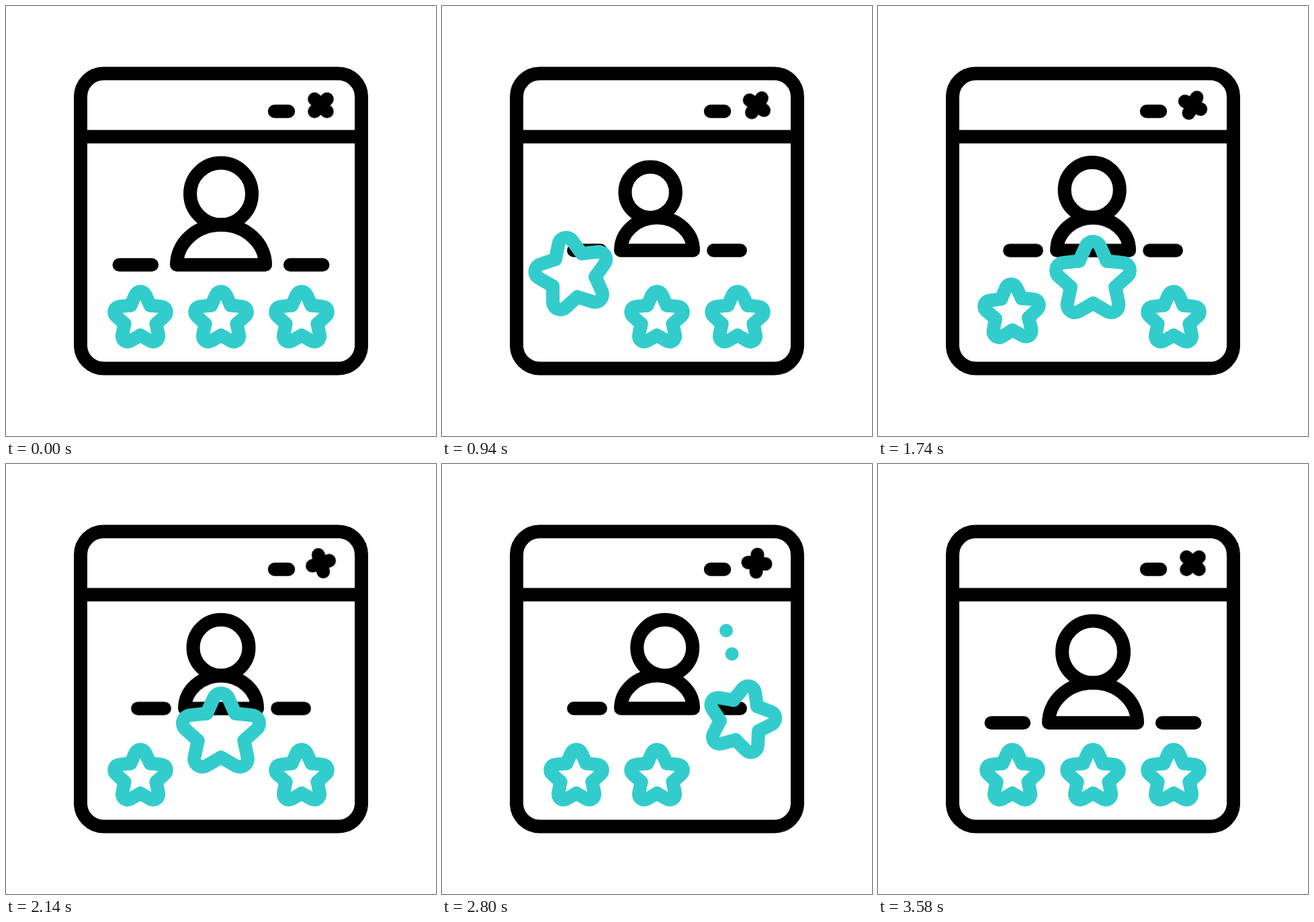
An HTML page without scripts for the animation above (3600 ms loop, 640 by 640 pixels).

```html
<!DOCTYPE html>
<html lang="en">
<head>
<meta charset="utf-8">
<title>Profile rating</title>
<style>
  @property --p { syntax: "<number>"; inherits: true; initial-value: 0; }

  html, body { margin: 0; height: 100%; overflow: hidden; background: #fff; }
  svg { display: block; width: 100vw; height: 100vh; }

  svg { fill: none; stroke: #000; stroke-width: 20px; stroke-linecap: round; stroke-linejoin: round; }
  .teal { stroke: #3cc; }

  /* --p runs from rest (0) to the full pose (1); strokes keep their width */
  .pose {
    --s: calc(1 + var(--grow) * var(--p));
    transform:
      translate(calc(var(--x) + var(--dx, 0px) * var(--p)), calc(var(--y) + var(--dy, 0px) * var(--p)))
      rotate(calc(var(--turn, 0deg) * var(--p)))
      scale(var(--s));
    stroke-width: calc(20px / var(--s));
  }
  .pose, .head, .close, .spark { animation: 3600ms cubic-bezier(.37, 0, .63, 1) infinite; }

  .figure { --x: 320px; --y: 267px; --grow: -.182; animation-name: shrink; }
  .left   { --x: 200px; --y: 465.5px; --dx: -7px; --dy: -80px; --turn: -15deg; --grow: .465; animation-name: first; }
  .middle { --x: 320px; --y: 465.5px; --dy: -65px; --grow: .465; animation-name: next; }
  .right  { --x: 440px; --y: 465.5px; --dx: 5px; --dy: -85px; --turn: 15deg; --grow: .266; animation-name: next; animation-delay: 800ms; }
  .head   { cx: 320px; cy: 279.5px; r: 46px; animation-name: look; }
  .close  { transform: translate(468.5px, 147.7px); animation-name: spin; animation-timing-function: linear; }
  .spark  { stroke-dasharray: 1px 2px; animation-name: spark; }

  @keyframes shrink {
    0%, 5.556% { --p: 0; }
    15.556%, 81.944% { --p: 1; }
    95.833%, 100% { --p: 0; }
  }
  @keyframes first {
    0%, 16.111% { --p: 0; }
    30%, 37.5% { --p: 1; }
    51.389%, 100% { --p: 0; }
  }
  @keyframes next {
    0%, 37.5% { --p: 0; }
    51.389%, 59.722% { --p: 1; }
    73.611%, 100% { --p: 0; }
  }
  @keyframes look {
    0%, 5.556% { cx: 320px; cy: 279.5px; r: 46px; }
    15.556%, 16.111% { cx: 320px; cy: 277.2px; r: 37.7px; }
    30%, 37.5% { cx: 308px; cy: 277.2px; r: 37.7px; }
    51.389%, 59.722% { cx: 320px; cy: 273.3px; r: 41.5px; }
    73.611%, 81.944% { cx: 331.7px; cy: 273.3px; r: 41.5px; }
    95.833%, 100% { cx: 320px; cy: 279.5px; r: 46px; }
  }
  @keyframes spin {
    0%, 5.556% { transform: translate(468.5px, 147.7px) rotate(0deg); }
    16.111% { transform: translate(468.5px, 147.7px) rotate(-57deg); }
    40% { transform: translate(468.5px, 147.7px) rotate(-159deg); }
    48.333% { transform: translate(468.5px, 147.7px) rotate(-198deg); }
    66.667% { transform: translate(468.5px, 147.7px) rotate(-270deg); }
    88.889% { transform: translate(468.5px, 147.7px) rotate(-350.5deg); animation-timing-function: cubic-bezier(.1, .42, .4, 1); }
    100% { transform: translate(468.5px, 147.7px) rotate(-360deg); }
  }
  @keyframes spark {
    0%, 77.7% { visibility: hidden; stroke-dashoffset: 1px; }
    77.8% { visibility: visible; stroke-dashoffset: 1px; }
    84.7%, 89% { visibility: visible; stroke-dashoffset: 0px; }
    95.4% { visibility: visible; stroke-dashoffset: -1px; }
    95.5%, 100% { visibility: hidden; stroke-dashoffset: -1px; }
  }
</style>
</head>
<body>
<svg viewBox="0 0 640 640">
  <defs>
    <path id="arm" d="M-14.5-19.9L-7.5-35.6A8.2 8.2 0 0 1 7.5-35.6L14.5-19.9"/>
    <g id="star">
      <use href="#arm"/>
      <use href="#arm" transform="rotate(72)"/>
      <use href="#arm" transform="rotate(144)"/>
      <use href="#arm" transform="rotate(216)"/>
      <use href="#arm" transform="rotate(288)"/>
    </g>
  </defs>

  <rect x="111" y="100.5" width="418" height="439" rx="34.5"/>
  <path d="M111 194.4H529M399.8 156.8H420.2"/>
  <path class="close" d="M-9.3-9.3L9.3 9.3M9.3-9.3L-9.3 9.3"/>

  <g class="pose figure">
    <path d="M-66 118.3A66 59.5 0 0 1 66 118.3Z"/>
    <path d="M-151.5 118.3H-102.9M102.9 118.3H151.5"/>
  </g>
  <circle class="head"/>

  <g class="teal">
    <path class="spark" pathLength="1" d="M423 248L439 231.5"/>
    <path class="spark" pathLength="1" d="M431.5 282.7L455 285.7"/>
    <g class="pose left"><use href="#star"/></g>
    <g class="pose middle"><use href="#star"/></g>
    <g class="pose right"><use href="#star"/></g>
  </g>
</svg>
</body>
</html>
```
